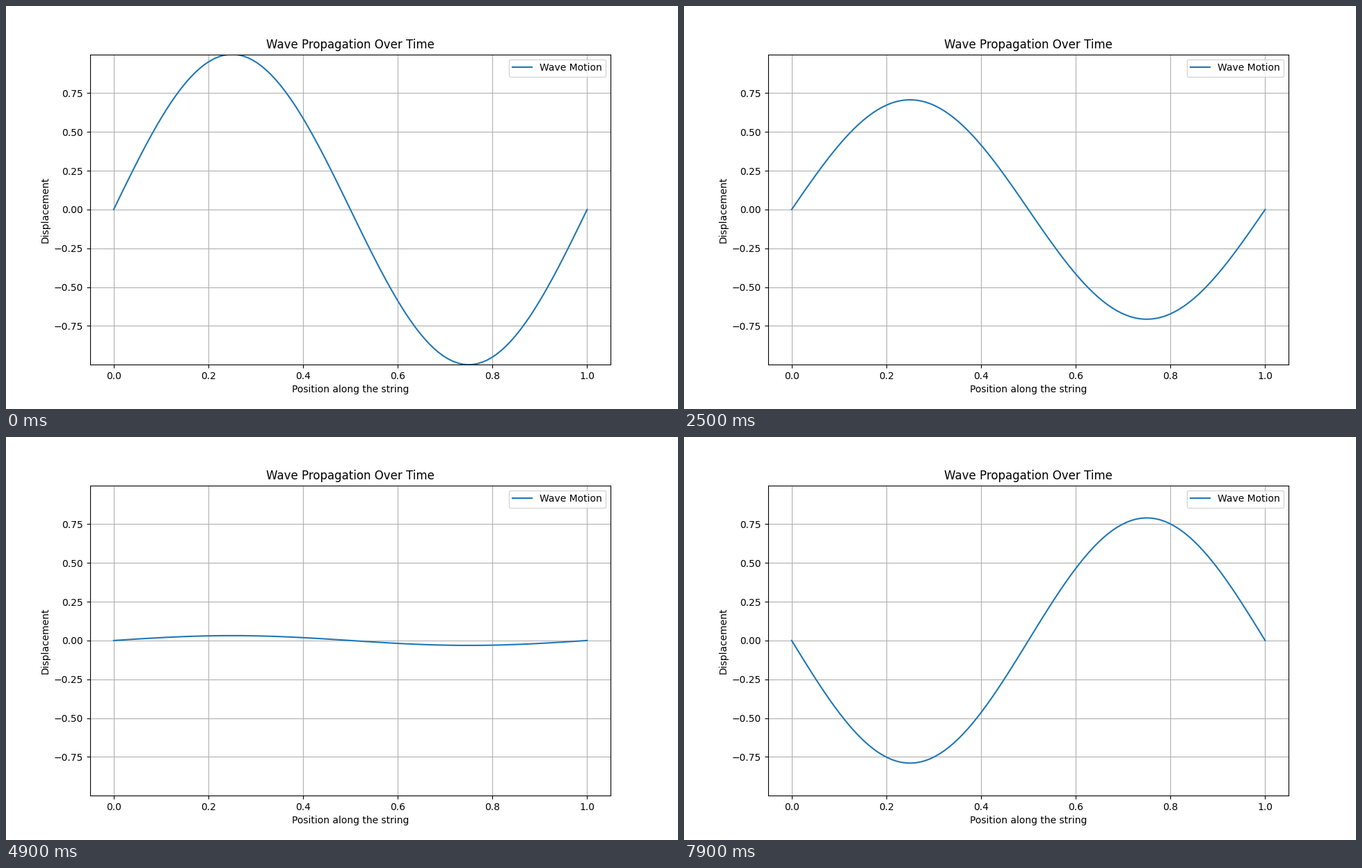
Recreate the animation shown at these times as a matplotlib script. Size 966x580 px, loop 8 s.

```python
import numpy as np
import matplotlib.pyplot as plt
from matplotlib.animation import FuncAnimation

WIDTH, HEIGHT, DPI = 966, 580, 100
FRAMES, INTERVAL = 80, 100
HALF_PERIOD = 100  # frames from crest to trough

x = np.linspace(0, 1, 100)
shape = np.sin(2 * np.pi * x)

fig, ax = plt.subplots(figsize=(WIDTH / DPI, HEIGHT / DPI), dpi=DPI)
line, = ax.plot(x, shape, label="Wave Motion")
ax.set_xlim(-0.05, 1.05)
ax.set_ylim(shape.min(), shape.max())
ax.set_title("Wave Propagation Over Time")
ax.set_xlabel("Position along the string")
ax.set_ylabel("Displacement")
ax.legend(loc="upper right")
ax.grid(True)


def update(i):
    line.set_ydata(shape * np.cos(np.pi * i / HALF_PERIOD))
    return line,


anim = FuncAnimation(fig, update, frames=FRAMES, interval=INTERVAL,
                     repeat=True, repeat_delay=0, blit=False)
plt.show()
```
